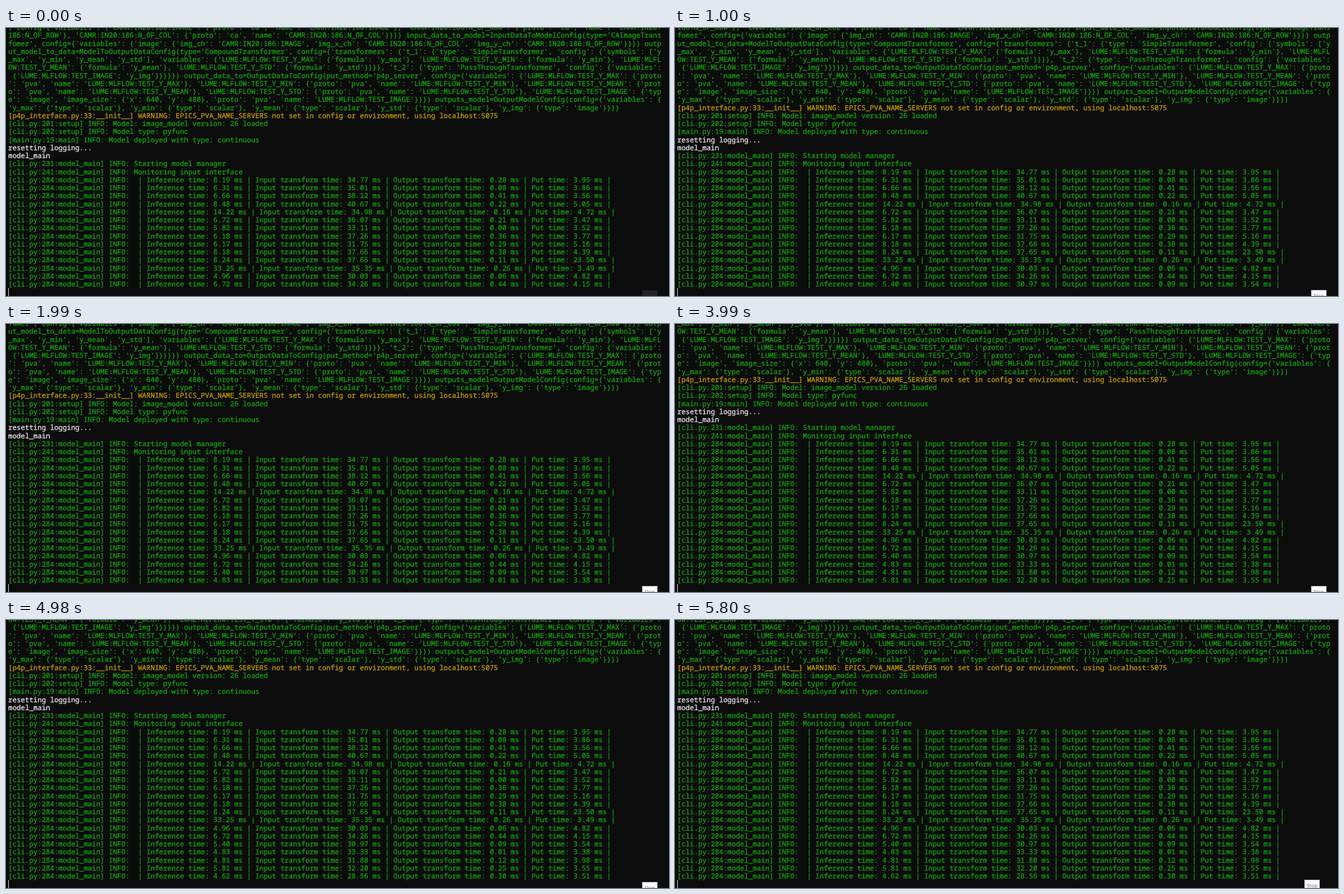
An HTML page with a canvas for the animation above (5.87 s loop, 1176 px wide and 476 px high).

```html
<!DOCTYPE html>
<html lang="en">
<head>
<meta charset="utf-8">
<title>Model log</title>
<style>
  html, body { margin: 0; width: 100%; height: 100%; overflow: hidden; background: #0c0c0c; }
  canvas { display: block; }
</style>
</head>
<body>
<canvas id="stage" width="1176" height="476"></canvas>
<script>
const ctx = document.getElementById('stage').getContext('2d');
const WIDTH = 1176, HEIGHT = 476, LOOP = 5870;
const COLUMNS = 156, LEFT = 4, CELL = 7.425, ROW = 14.25, LAST_BASELINE = 459;
const BACK = '#0c0c0c', GREEN = '#13a10e', YELLOW = '#c19c00', WHITE = '#e5e5e5';
const LOG_ROWS = 19;
const arrivals = [1000, 1990, 3000, 3990, 4980];

const config =
  `, config={'variables': {'CAMR:IN20:186:IMAGE': {'proto': 'ca', 'name': 'CAMR:IN20:186:IMAGE'}, ` +
  `'CAMR:IN20:186:N_OF_ROW': {'proto': 'ca', 'name': 'CAMR:IN20:186:N_OF_ROW'}, ` +
  `'CAMR:IN20:186:N_OF_COL': {'proto': 'ca', 'name': 'CAMR:IN20:186:N_OF_COL'}}}) ` +
  `input_data_to_model=InputDataToModelConfig(type='CAImageTransfomer', config={'variables': ` +
  `{'image': {'img_ch': 'CAMR:IN20:186:IMAGE', 'img_x_ch': 'CAMR:IN20:186:N_OF_COL', ` +
  `'img_y_ch': 'CAMR:IN20:186:N_OF_ROW'}}}) ` +
  `output_model_to_data=ModelToOutputDataConfig(type='CompoundTransformer', config={'transformers': ` +
  `{'t_1': {'type': 'SimpleTransformer', 'config': {'symbols': ['y_max', 'y_min', 'y_mean', 'y_std'], ` +
  `'variables': {'LUME:MLFLOW:TEST_Y_MAX': {'formula': 'y_max'}, ` +
  `'LUME:MLFLOW:TEST_Y_MIN': {'formula': 'y_min'}, 'LUME:MLFLOW:TEST_Y_MEAN': {'formula': 'y_mean'}, ` +
  `'LUME:MLFLOW:TEST_Y_STD': {'formula': 'y_std'}}}}, 't_2': {'type': 'PassThroughTransformer', ` +
  `'config': {'variables': {'LUME:MLFLOW:TEST_IMAGE': 'y_img'}}}}}) ` +
  `output_data_to=OutputDataToConfig(put_method='p4p_server', config={'variables': {` +
  ['MAX', 'MIN', 'MEAN', 'STD'].map(stat =>
    `'LUME:MLFLOW:TEST_Y_${stat}': {'proto': 'pva', 'name': 'LUME:MLFLOW:TEST_Y_${stat}'}, `).join('') +
  `'LUME:MLFLOW:TEST_IMAGE': {'type': 'image', 'image_size': {'x': 640, 'y': 480}, ` +
  `'proto': 'pva', 'name': 'LUME:MLFLOW:TEST_IMAGE'}}}) ` +
  `outputs_model=OutputModelConfig(config={'variables': {` +
  ['max', 'min', 'mean', 'std'].map(stat => `'y_${stat}': {'type': 'scalar'}, `).join('') +
  `'y_img': {'type': 'image'}}})`;

const line = (text, color = GREEN) => ({ text, color });
const clamp = v => Math.min(1, Math.max(0, v));

function random(seed) {
  const v = Math.sin(seed * 12.9898) * 43758.5453;
  return v - Math.floor(v);
}

// Timings hover around a typical load; a few rows spike.
const inferenceSpikes = { 4: 14.22, 11: 33.25 }, putSpikes = { 10: 23.5 };

function timingLine(row) {
  const noise = part => random(row * 4 + part + 1);
  const load = noise(0);
  const timings = {
    'Inference': inferenceSpikes[row] ?? 4.5 + 4 * load,
    'Input transform': 27 + 8 * load + 7 * noise(1),
    'Output transform': 0.5 * noise(2),
    'Put': putSpikes[row] ?? 3.2 + 2 * noise(3)
  };
  const cells = Object.entries(timings).map(([name, ms]) => `${name} time: ${ms.toFixed(2)} ms |`);
  return line('[cli.py:284:model_main] INFO:  | ' + cells.join(' '));
}

const lines = [
  ...config.match(new RegExp(`.{1,${COLUMNS}}`, 'g')).map(text => line(text)),
  line('[p4p_interface.py:33:__init__] WARNING: EPICS_PVA_NAME_SERVERS not set in config or environment, using localhost:5075', YELLOW),
  line('[cli.py:201:setup] INFO: Model: image_model version: 26 loaded'),
  line('[cli.py:202:setup] INFO: Model type: pyfunc'),
  line('[main.py:19:main] INFO: Model deployed with type: continuous'),
  line('resetting logging...', WHITE),
  line('model_main', WHITE),
  line('[cli.py:231:model_main] INFO: Starting model manager'),
  line('[cli.py:241:model_main] INFO: Monitoring input interface'),
  ...Array.from({ length: LOG_ROWS }, (_, row) => timingLine(row))
];

const hovers = [
  { show: 0, hide: 5110, x: 1128, y: 465 },
  { show: 5510, hide: LOOP, x: 1101, y: 460 },
  { show: 5660, hide: LOOP, x: 1116, y: 461 }
];

// The tooltip fades in coarse 70 ms steps.
const fade = elapsed => clamp((Math.floor(elapsed / 70) + 0.14) / 2);

function drawLine({ text, color }, baseline) {
  ctx.fillStyle = ctx.strokeStyle = color;
  [...text].forEach((char, column) => {
    if (char === ' ') return;
    const x = LEFT + column * CELL;
    ctx.fillText(char, x, baseline);
    ctx.strokeText(char, x, baseline);
  });
}

function drawTooltip(time) {
  const { show, hide, x, y } = hovers.findLast(hover => hover.show <= time);
  ctx.globalAlpha = fade(time - show) * (1 - fade(time - hide));
  ctx.fillStyle = '#767676';
  ctx.fillRect(x, y, 28, 24);
  ctx.fillStyle = '#ffffff';
  ctx.fillRect(x + 1, y + 1, 26, 24);
  ctx.fillStyle = '#575757';
  ctx.font = '8.8px "Open Sans", sans-serif';
  ctx.fillText('Stop', x + 4.7, y + 14);
  ctx.globalAlpha = 1;
}

function drawTerminal(time) {
  ctx.fillStyle = BACK;
  ctx.fillRect(0, 0, WIDTH, HEIGHT);
  ctx.textRendering = 'geometricPrecision';
  ctx.font = `${CELL / 0.6}px "Noto Sans Mono", monospace`;
  ctx.lineWidth = 0.35;
  ctx.lineJoin = 'round';
  const pending = arrivals.filter(start => start > time).length;
  let baseline = LAST_BASELINE;
  for (let i = lines.length - 1 - pending; i >= 0 && baseline > -4; i--) {
    drawLine(lines[i], baseline);
    baseline -= ROW;
  }
  ctx.fillStyle = WHITE;
  ctx.fillRect(LEFT, 462, 1, 14);
}

let origin;
function tick(now) {
  origin ??= now;
  const time = (now - origin) % LOOP;
  drawTerminal(time);
  drawTooltip(time);
  requestAnimationFrame(tick);
}
requestAnimationFrame(tick);
</script>
</body>
</html>
```
